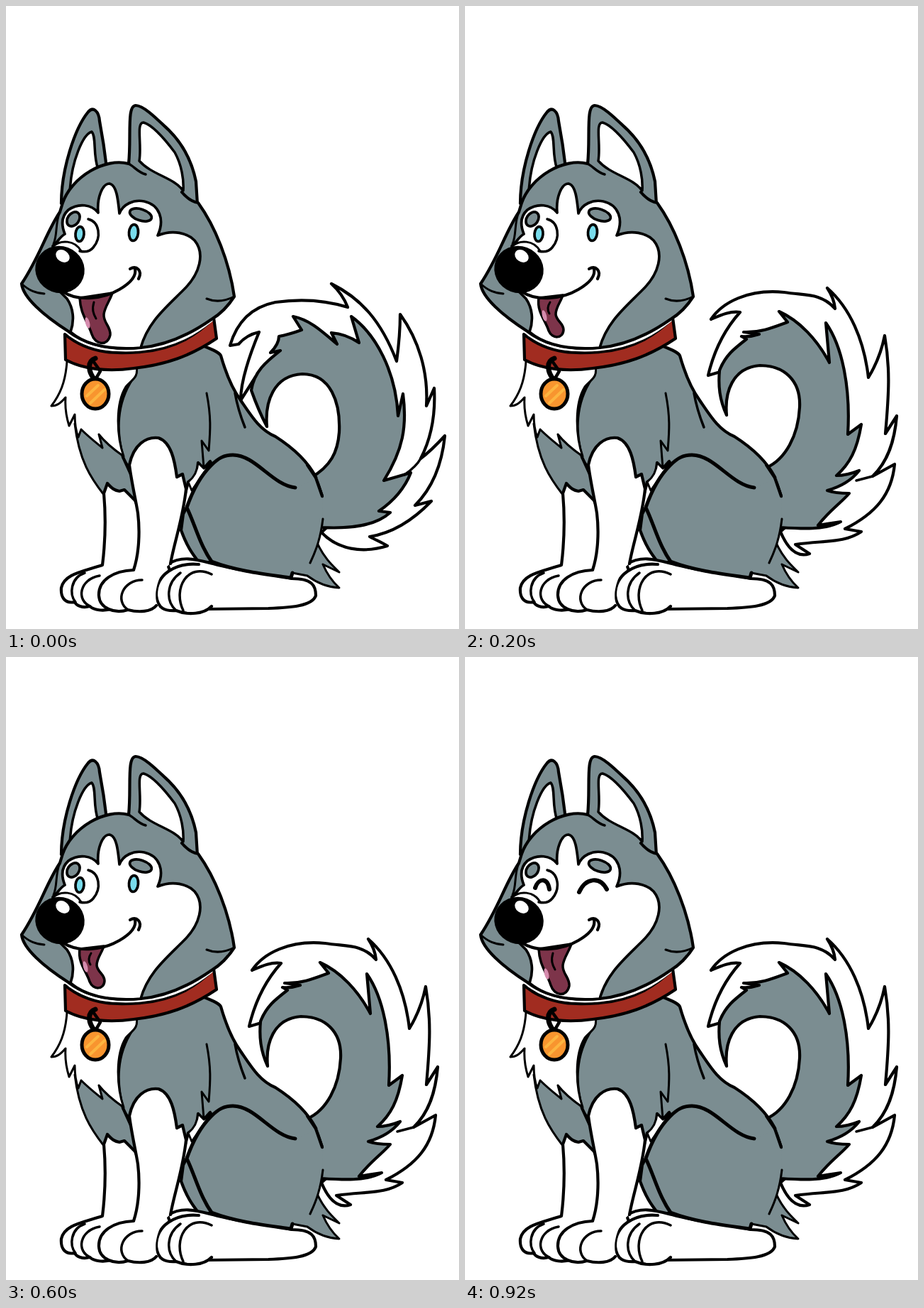
Write an HTML page that moves like this. It is 639 px wide and 877 px high and loops after 1 s.

```html
<!DOCTYPE html>
<html lang="en">
<head>
<meta charset="utf-8">
<title>Happy husky</title>
<style>
html, body { margin: 0; width: 100%; height: 100%; overflow: hidden; background: #fff; }
svg { display: block; width: 100vw; height: 100vh; }
</style>
</head>
<body>
<svg id="stage" viewBox="0 0 639 877" stroke-linejoin="round" stroke-linecap="round"></svg>
<script>
const NS = 'http://www.w3.org/2000/svg';
const GRAY = '#7b8d91', WHITE = '#fff', RED = '#a12c20', INK = '#000';
const stage = document.getElementById('stage');

function add(parent, tag, attrs) {
  const el = document.createElementNS(NS, tag);
  for (const key in attrs) el.setAttribute(key, attrs[key]);
  return parent.appendChild(el);
}
const group = () => add(stage, 'g', {});
const shape = (g, fill, d, width = 4.2) =>
  add(g, 'path', { d, fill, stroke: width ? INK : 'none', 'stroke-width': width });
const line = (g, d, width = 4.2) => shape(g, 'none', d, width);
const oval = (g, fill, cx, cy, rx, ry, turn = 0, width = 0) =>
  add(g, 'ellipse', { cx, cy, rx, ry, fill, transform: `rotate(${turn} ${cx} ${cy})`,
    stroke: width ? INK : 'none', 'stroke-width': width });

// Tail, swung left
const tailLeft = group();
shape(tailLeft, WHITE, `M331 555C331 530 340 500 357 459C343 462 335 468 328 476L316 478
  C325 447 345 424 380 417C415 412 450 414 482 424C477 411 469 400 459 391
  C501 412 529 443 551 500C554 478 556 456 556 434C582 470 596 515 593 563L604 538
  C606 574 600 608 585 637C597 628 608 617 619 605C615 645 602 678 577 703L600 697
  C574 724 545 742 513 747C522 752 530 755 538 760C502 771 468 765 445 741
  L500 690L510 600L480 520L420 490L370 510L352 522Z`);
shape(tailLeft, GRAY, `M346 541C350 514 368 500 387 485L373 488C381 480 385 472 385 465
  C396 463 406 460 417 456L405 437C430 442 448 460 467 476L459 460C473 461 486 466 498 474
  L487 437C522 462 550 515 553 577L560 546C566 592 560 625 533 668L571 657
  C562 680 545 698 526 711L542 713C520 733 483 736 445 734L430 664
  C458 648 468 628 470 600C472 558 458 518 418 518C377 520 365 558 368 592C359 575 352 558 346 541Z`);
line(tailLeft, 'M585 637C580 646 572 653 562 660', 3.5);

// Tail, swung right
const tailRight = group();
shape(tailRight, WHITE, `M343 520C350 490 362 460 388 431C374 429 361 435 347 441
  C363 417 400 398 450 403C480 408 501 403 522 426C521 416 517 406 511 397
  C543 425 563 470 569 523C580 505 588 484 592 464C600 510 598 546 593 602L609 577
  C606 612 597 641 575 662L606 645C602 687 580 714 536 736L559 740
  C535 756 510 752 466 758L486 771C468 777 455 764 445 740
  L500 690L510 600L490 530L430 490L380 500L360 515Z`);
shape(tailRight, GRAY, `M359 513C367 492 380 482 397 469L390 465C399 466 406 465 415 462L393 459
  C417 460 436 452 455 445L443 430C472 443 497 470 514 502L509 446C533 480 544 540 540 603
  L559 589C553 625 543 644 524 661C536 661 546 658 556 654
  C545 668 529 677 511 682C522 686 532 686 542 686C530 700 514 710 498 731L530 726
  C508 738 475 736 445 734L425 650C452 638 470 605 472 565C474 527 450 506 416 506
  C377 509 366 544 369 576C359 554 357 535 359 513Z`);
line(tailRight, 'M575 662L552 668', 3.5);

// Body
const body = group();
shape(body, GRAY, 'M250 715L247 738C255 760 262 770 272 783L294 783L258 700Z');
shape(body, GRAY, 'M97 588C103 640 120 665 138 688L143 672C150 680 154 682 160 683L167 681L182 696L190 600Z', 3);
shape(body, GRAY, `M185 500L272 476C290 483 300 487 303 492C311 520 320 540 331 555
  C346 577 358 597 380 606C405 622 425 640 437 663L446 690L400 720L300 660L288 641
  L279 651L271 643C270 657 266 665 257 670L252 690L190 690L165 635
  C155 600 155 560 178 525L183 518Z`);
line(body, 'M323 545C326 562 331 578 337 593', 3.5);
line(body, 'M283 545C290 580 288 600 286 626L276 612L279 650', 3);
shape(body, WHITE, 'M257 670L262 682L289 643L279 651L271 643C270 655 266 663 257 670Z', 3);

// Hind leg and foot
shape(body, WHITE, 'M228 786C248 773 268 779 292 785C330 796 372 799 403 806C432 806 437 816 437 830C432 845 400 847 370 848L280 849L240 820Z');
shape(body, GRAY, `M255 706C264 680 276 660 289 647C300 636 308 632 320 632C350 632 370 672 408 678L440 664L446 690L447 722
  L440 758C449 777 460 787 470 797L447 786C453 800 460 810 470 819C452 818 437 811 425 802
  L404 798L402 805C367 800 327 796 290 782C273 758 266 728 255 706Z`, 0);
line(body, 'M408 678C375 674 352 632 320 632C308 632 300 636 289 647C276 660 264 680 255 706C266 728 273 758 290 782C327 796 367 800 402 805L404 798', 5);
line(body, 'M404 798L425 802C437 811 452 818 470 819C460 810 453 800 447 786L470 797C460 787 449 777 440 758', 3);
line(body, 'M447 722C444 748 438 765 429 784', 3);
line(body, 'M425 646L437 664L446 690');
shape(body, WHITE, 'M272 786C238 783 211 801 212 830C214 849 225 852 240 851C256 858 280 856 290 845L300 808Z', 0);
line(body, 'M272 786C238 783 211 801 212 830C214 849 225 852 240 851C256 858 280 856 290 845');
line(body, 'M246 798C226 812 225 838 240 851M290 800C256 783 235 820 250 851', 3.5);

// Front legs
shape(body, WHITE, `M138 686L143 672C150 680 154 682 160 683L167 681L182 696L200 740L190 800
  L150 848C137 853 124 850 118 845C108 848 99 844 97 839C82 842 77 831 78 819
  C82 800 105 797 136 787C140 755 141 720 138 686Z`);
line(body, 'M111 798C91 805 89 828 98 839M132 802C103 807 99 837 119 845', 3.5);
shape(body, WHITE, `M174 646C180 617 198 606 215 608C233 614 238 640 241 663L249 659L254 680
  C250 720 238 752 232 785C216 795 206 830 214 843C205 853 187 854 172 850
  C153 856 132 848 131 830C130 808 152 795 180 794C188 770 189 739 186 714C183 695 177 670 174 646Z`, 0);
line(body, 'M232 785C238 752 250 720 254 680L249 659L241 663C238 640 233 614 215 608C198 606 180 617 174 646C177 670 183 695 186 714C189 739 188 770 180 794C152 795 130 808 131 830C132 848 153 856 172 850C187 854 205 853 212 844');
line(body, 'M165 636L174 650', 3);
line(body, 'M192 808C165 808 153 837 172 850', 3.5);

// Chest fur
shape(body, WHITE, `M86 500C84 530 76 547 64 563C72 563 77 559 84 551C83 565 85 578 89 591L97 575
  C97 587 98 597 102 607L106 596C116 606 125 613 136 622L131 603C141 616 153 625 166 634
  C156 605 154 560 169 536C178 525 187 524 184 507Z`, 3);

// Collar and tag
shape(body, RED, 'M83 462C120 493 165 489 190 487C240 483 270 462 293 439L297 468C260 493 225 505 180 510C145 515 110 512 84 498Z');
add(body, 'path', { d: 'M90 463C125 487 165 486 190 484C240 480 270 459 290 443', fill: 'none', stroke: WHITE, 'stroke-width': 3 });
line(body, 'M126 496C114 500 116 515 125 526', 7);
line(body, 'M123 500L133 514L126 526', 4.5);
oval(body, '#f8952f', 126, 546, 19, 21, 0, 5);
add(body, 'path', { d: 'M114 549L130 534M119 559L139 540', stroke: '#fcb540', 'stroke-width': 4 });

// Ears and head
const head = group();
shape(head, GRAY, 'M78 278C78 230 97 172 116 149C123 141 131 148 132 162C136 183 139 202 142 228L120 260Z');
shape(head, WHITE, 'M90 262C92 218 109 180 121 177C128 186 122 208 130 230Z', 3.5);
shape(head, GRAY, 'M173 222C177 185 170 140 183 140C194 140 212 158 230 175C252 197 263 222 268 247L270 279L190 250Z');
shape(head, GRAY, `M76 290C56 320 48 352 22 391C24 410 52 435 88 458C120 483 165 483 190 481
  C235 477 270 455 290 441C305 432 315 420 322 409C315 360 295 310 271 277
  C245 267 210 240 178 223C140 212 93 240 80 277Z`, 0);
line(head, 'M173 222C140 213 93 240 80 277L76 290C56 320 48 352 22 391C24 410 52 435 88 458C120 483 165 483 190 481C235 477 270 455 290 441C305 432 315 420 322 409C315 360 295 310 271 277C260 275 253 268 248 262');
shape(head, WHITE, 'M188 218C192 195 183 164 194 164C208 168 226 190 238 206C248 224 251 245 250 260C236 241 206 238 188 218Z', 3.5);
line(head, 'M173 222C181 226 186 234 197 237', 3.5);
line(head, 'M22 391C33 401 42 404 54 405M322 409C308 416 295 417 283 412', 3);

// Face
shape(head, WHITE, `M130 291C128 270 136 250 146 250C156 252 158 272 160 292
  C165 279 180 272 195 275C217 280 224 301 214 323C236 314 256 320 266 330
  C281 348 274 377 250 400C225 425 200 445 190 481C165 483 120 483 91 459
  C97 442 95 425 86 412L70 396L66 338C74 331 76 325 83 321C77 306 79 295 88 287C102 277 121 279 130 291Z`, 3.7);
line(head, 'M76 290C69 306 73 322 67 335M67 338C77 329 97 329 106 345', 3);
line(head, 'M116 300C132 304 135 326 123 340C118 346 112 347 104 345', 3.5);
oval(head, GRAY, 95, 300, 8, 11, 35, 3.7);
oval(head, GRAY, 190, 294, 16, 8, 18, 3.7);

const eyesOpen = group();
oval(eyesOpen, '#78dcec', 104, 321, 6, 10.5, 5, 3.7);
oval(eyesOpen, '#78dcec', 180, 319, 6.5, 11.5, 5, 3.7);
const eyesShut = group();
line(eyesShut, 'M99 325C103 312 116 309 119 327', 6);
line(eyesShut, 'M161 331C170 311 190 308 200 327', 6);

// Tongue, long and short
function tongue(outline, fold, x, y) {
  const g = group();
  shape(g, '#7d344a', outline, 3.5);
  line(g, fold, 3);
  oval(g, '#d58bad', x, y, 3, 8, -15);
  return g;
}
const tongueLong = tongue('M104 411C105 433 114 442 121 462C126 478 144 479 147 463C148 451 137 446 138 434C139 424 147 414 150 404Z',
  'M124 417C121 427 123 433 127 440', 115, 446);
const tongueShort = tongue('M104 411C101 431 114 443 118 457C123 469 138 469 139 456C139 446 129 444 128 434C128 424 135 417 138 407Z',
  'M120 417C116 423 116 428 119 433', 112, 436);

const muzzle = group();
line(muzzle, 'M80 402C102 417 138 412 160 399C179 388 184 379 182 370');
line(muzzle, 'M175 370C184 365 193 372 187 384');
oval(muzzle, INK, 76, 371, 35, 33, 20);
oval(muzzle, WHITE, 80, 352, 10.5, 8, 35);

const STEP = 200, STEPS = 5;
const show = (el, on) => el.setAttribute('visibility', on ? 'visible' : 'hidden');

function draw(ms) {
  const step = Math.floor(ms / STEP) % STEPS;
  const smile = step === STEPS - 1;
  const left = step % 2 === 0 && !smile;
  show(tailLeft, left);
  show(tailRight, !left);
  show(tongueLong, left || smile);
  show(tongueShort, !left && !smile);
  show(eyesOpen, !smile);
  show(eyesShut, smile);
}

const start = performance.now();
function tick() {
  draw(performance.now() - start);
  requestAnimationFrame(tick);
}
tick();
</script>
</body>
</html>
```
